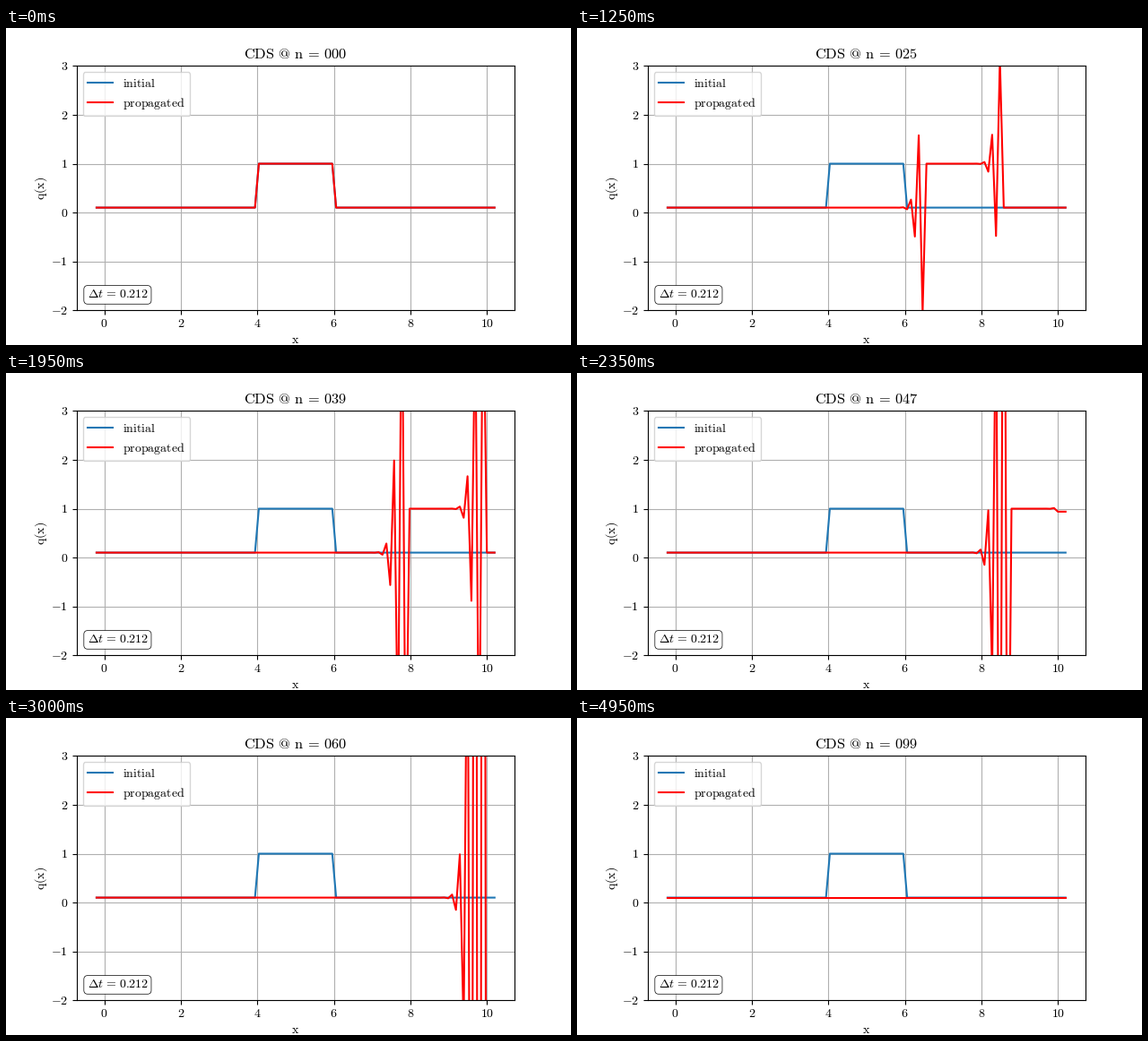
Animation, 630 px wide and 354 px high, one loop 5 s. Source, as a matplotlib script:

```python
import numpy as np
import matplotlib.pyplot as plt
from matplotlib.animation import FuncAnimation
from matplotlib.patches import FancyBboxPatch

plt.rcParams["mathtext.fontset"] = "cm"

W, H, DPI = 630, 354, 100
STEPS = 100
CELLS, GHOSTS = 100, 2
COURANT = 1.05  # slightly above the stability limit
SPEED = 0.5

dx = 10 / (CELLS - 1)
dt = COURANT * dx / SPEED
x = dx * np.arange(-GHOSTS, CELLS + GHOSTS)
start = np.where((x > 4) & (x < 6), 1.0, 0.1)


def advance(q):
    new = q.copy()
    new[1:] -= COURANT * (q[1:] - q[:-1])
    new[:GHOSTS] = 0.1
    new[-GHOSTS:] = new[-GHOSTS - 1]  # free outflow
    return new


states = [start]
for _ in range(STEPS - 1):
    states.append(advance(states[-1]))

fig, ax = plt.subplots(figsize=(W / DPI, H / DPI), dpi=DPI)


def label(px, py, body, size=10, **kw):
    """Place math text with its baseline at a pixel position from the top left."""
    return fig.text(px / DPI, (H - py) / DPI, f"${body}$", fontsize=size,
                    va="baseline", transform=fig.dpi_scale_trans, **kw)


def title_text(n):
    gap, eq = r"\hspace{0.38}", r"\hspace{0.18}=\hspace{0.18}"
    return rf"\mathrm{{CDS{gap}@{gap}n{eq}{n:03d}}}"


ax.plot(x, start, color="C0", label=r"$\mathrm{initial}$")
wave, = ax.plot(x, start, color="red", label=r"$\mathrm{propagated}$")
margin = 0.05 * (x[-1] - x[0])
ax.set_xlim(x[0] - margin, x[-1] + margin)
ax.set_ylim(-2, 3)
ax.set_xticks(range(0, 11, 2))
ax.set_yticks(range(-2, 4))
ax.tick_params(labelbottom=False, labelleft=False)
ax.grid(True)
ax.legend(loc="upper left")

# Axis labels
left, right = 0.125 * W, 0.9 * W
top, bottom = 0.12 * H, 0.89 * H
center = (left + right) / 2
x_min, x_max = ax.get_xlim()
for v in range(0, 11, 2):
    px = left + (v - x_min) / (x_max - x_min) * (right - left)
    label(px, bottom + 19.2, v, ha="center")
for v in range(-2, 4):
    py = bottom - (v + 2) / 5 * (bottom - top)
    label(left - 9.7, py + 4.8, v, ha="right")
label(center, 352.2, r"\mathrm{x}", ha="center")
label(42.5, (top + bottom) / 2, r"\mathrm{q(x)}", ha="right",
      rotation=90, rotation_mode="anchor").set_ha("center")

# Time step box
fig.add_artist(FancyBboxPatch(
    (0.91, (H - 304.1) / DPI), 0.668, 0.123,
    boxstyle="round,pad=0.0417", mutation_scale=1, fc="white", ec="black",
    lw=0.5, transform=fig.dpi_scale_trans))
label(91, 301.4, rf"\Delta t\hspace{{0.12}}=\hspace{{0.12}}{dt:.3f}", zorder=4)

title = label(center, 34.1, title_text(0), size=11.75, ha="center")


def update(n):
    wave.set_ydata(states[n])
    title.set_text(f"${title_text(n)}$")
    return wave, title


anim = FuncAnimation(fig, update, frames=STEPS, interval=50,
                     repeat=True, repeat_delay=0)
plt.show()
```
